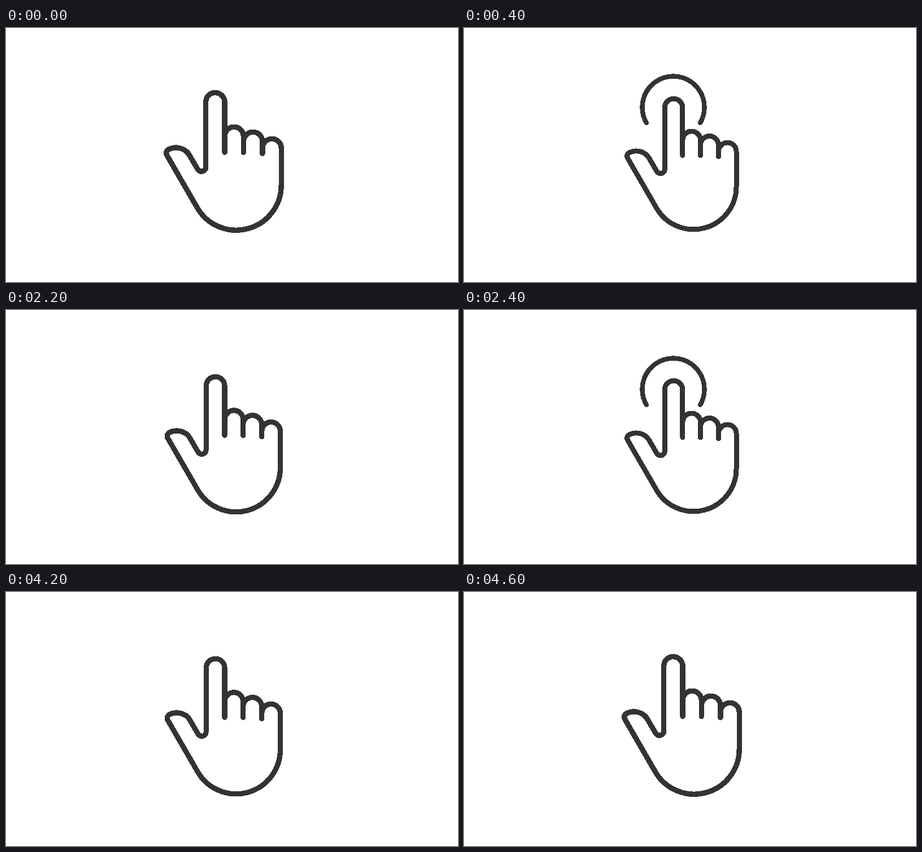
An HTML page for the animation above (6 s loop, 800 by 450 pixels).

```html
<!DOCTYPE html>
<html lang="en">
<head>
<meta charset="utf-8">
<title>Tap gesture</title>
<style>
html, body { margin: 0; width: 100%; height: 100%; overflow: hidden; background: #fff; }
svg { display: block; width: 100%; height: 100%; }
path { fill: none; stroke: #333; stroke-linecap: round; stroke-linejoin: round; shape-rendering: crispEdges; }
</style>
</head>
<body>
<svg viewBox="0 0 800 450">
  <path id="ring" stroke-width="8.4"/>
  <g id="hand" stroke-width="9.4">
    <path d="M387.1 220.3V131.3A16.7 16.7 0 0 0 353.7 131.3V246
      C353.7 254.3 343.5 257.6 338.3 248.7L324.4 225
      C317 212.2 300 208.9 287.7 215.1C284.8 216.7 281.9 221 284.7 225.3
      L338.5 318.4A79.7 79.7 0 0 0 487.2 278.5V212.9
      A16.6 16.6 0 0 0 454 212.9"/>
    <path d="M387.1 191.8A16.6 16.6 0 0 1 420.3 191.8V220.3
      M420.3 201.1A16.8 16.8 0 0 1 453.9 201.1V222.5"/>
  </g>
</svg>
<script>
const hand = document.getElementById("hand");
const ring = document.getElementById("ring");
const PERIOD = 2000, STEP = 100;
const PIVOT = [384, 330], TIP = [370.5, 140.5];

// Arc of 240 degrees, open below the fingertip
function arc(r) {
  const [x, y] = TIP, dx = r * Math.cos(Math.PI / 6), dy = r / 2;
  return `M${x - dx} ${y + dy}A${r} ${r} 0 1 1 ${x + dx} ${y + dy}`;
}

function draw(ms) {
  const t = Math.floor((ms % PERIOD) / STEP) * STEP;
  const press = Math.max(0, 1 - Math.abs(t - 350) / 200);
  const scale = 1 - press / 15;
  const [x, y] = PIVOT;
  hand.setAttribute("transform", `translate(${x} ${y}) scale(${scale}) translate(${-x} ${-y})`);

  const shown = t >= 300 && t < 600;
  ring.setAttribute("visibility", shown ? "visible" : "hidden");
  if (shown) ring.setAttribute("d", arc(38.5 + (t - 300) * 0.165));
}

const start = performance.now();
function tick() {
  draw(performance.now() - start);
  requestAnimationFrame(tick);
}
draw(0);
requestAnimationFrame(tick);
</script>
</body>
</html>
```
